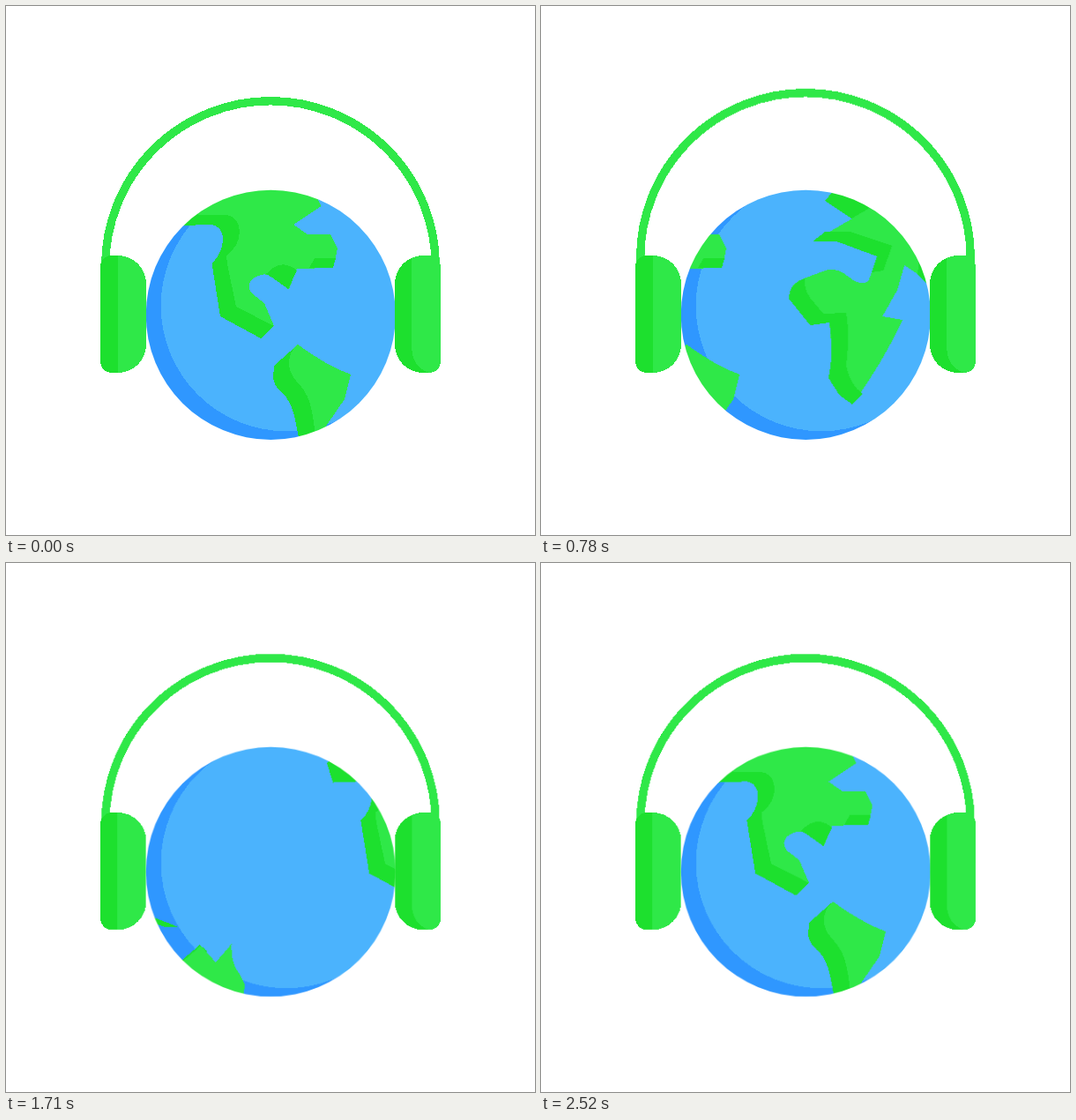
Write an HTML page without scripts that moves like this. It is 600 px wide and 600 px high and loops after 4.55 s.

```html
<!DOCTYPE html>
<html lang="en">
<head>
<meta charset="utf-8">
<title>Listening globe</title>
<style>
  html, body { margin: 0; width: 100%; height: 100%; overflow: hidden; background: #fff; }
  svg { display: block; width: 100%; height: 100%; shape-rendering: crispEdges; }

  .light { fill: #2fe848; }
  .dark { fill: #1de02e; }
  .sea { fill: #4bb3fd; }
  .shade { fill: #2f97ff; }
  .band { fill: none; stroke: #2fe848; stroke-width: 9.4; }

  .body, .band, .map { animation: 4550ms ease-in-out infinite; }
  .body { transform-origin: 300px 350.3px; animation-name: squash; }
  .band { animation-name: bob; }
  .map { animation-name: spin; }

  @keyframes spin {
    0% { transform: none; animation-timing-function: cubic-bezier(.333, 0, .655, 1); }
    55.385%, 100% { transform: translateX(-715px); }
  }
  @keyframes squash {
    0%, 7.91%, 18.9%, 27.25%, 41.54%, 48.13%, 100% { transform: none; }
    3.96%, 23.74%, 44.84% { transform: scale(1.047, .957); }
  }
  @keyframes bob {
    0%, 35.6%, 39.56%, 48.13%, 55.385%, 100% { transform: none; }
    3.3% { transform: translateY(9px); }
    8.57%, 17.14% { transform: translateY(-9.3px); }
    12.31% { transform: translateY(-11px); }
    22.86% { transform: translateY(9px); }
    25.05% { transform: translateY(6px); }
    30.77% { transform: translateY(-7px); }
    42.86% { transform: translateY(5.4px); }
    44.84% { transform: translateY(7px); }
    52.09% { transform: translateY(-10px); }
  }
</style>
</head>
<body>
<svg viewBox="0 0 600 600">
  <defs>
    <clipPath id="disc"><circle cx="300.3" cy="350.3" r="141.6"/></clipPath>
    <g id="land">
      <!-- North America -->
      <path class="dark" d="M211 200L211 209 195 227 202 249 228 248C240 246 247 255 246 267Q244 282 233.500 292L243 352 289 377 304 363 270 330 270 240Z"/>
      <path class="light" d="M208 200L218 237H250C264 239 268 255 262 269Q258 277 250 283L251 293 261 341 304 363 293 337 280 327C272 320 275 308 290 305Q296 303 302 308L321 321 330 298 371 297 376 275 368 259H342L326 248 357.500 227 345 200Z"/>
      <path class="dark" d="M295 304Q312 285 330 300L320 321 302 308ZM350 286H374L371 297H344Z"/>
      <!-- South America -->
      <path class="dark" d="M331 384L304 408 303 422Q304 430 311 437C326 449 327 464 333 495H353L356 420Z"/>
      <path class="light" d="M331 384Q321 392 321 405 321 416 329 425C346 442 347 456 352 495L355 488 384 446 391 418Q362 407 331 384Z"/>
      <!-- Eurasia and Africa -->
      <path class="light" d="M488 221L505 200 555 221 560 231 594 222 600 195H755L728 235 711 250Q697 268 695 280L690 317 695 329 694 337 684 343 655 317Q645 308 637 320L630 342H620L608 320 593 304 578 294 570 322 553 352 576 356Q553 405 519 452L504 441 492 422 496 395 493 359 471 362 447 332Q447 315 464 309L491 299C505 297 511 305 520 311Q530 317 537 312L541 302 547 284 501 267H474L519 241Z"/>
      <path class="dark" d="M488 221L505 200 545 222 537 230 518 241ZM474 267L488 256H516L564 272 554 300 541 302 547 284 501 267ZM595 283L620 297Q630 306 636 319L630 342H620L608 320 593 304ZM655 317L670 302.500 685 312 695 329 694 337 684 343ZM465 309Q464 321 471 331L486 349 512 348Q516 373 512 408 517 431 531 440L519 452 504 441 492 422Q498 392 493 359L471 362 447 332Q447 315 465 309Z"/>
      <!-- Southeast islands and Australia -->
      <path class="dark" d="M656.500 358L685.500 391 742 413H728L676 398 652.500 363ZM732 462L766 433 774 440 744 485Z"/>
      <path class="light" d="M735 462L767 434 784 453 802 432Q801 455 811 466L817 478 815 495H764L741 482Z"/>
    </g>
  </defs>

  <g class="body">
    <path class="band" d="M112.700 340V295A187.300 187.300 0 0 1 487.300 295V340"/>

    <g clip-path="url(#disc)">
      <path class="shade" d="M155 205H445V495H155Z"/>
      <circle class="sea" cx="318" cy="340" r="142.300"/>
      <!-- right side of the sea stays lit up to the rim -->
      <path class="sea" d="M318 198H445V420L382 467 318 340Z"/>
      <g class="map">
        <use href="#land"/>
        <use href="#land" x="715"/>
      </g>
    </g>

    <path class="light" d="M120 283H127A32 32 0 0 1 159 315V384A32 32 0 0 1 127 416H120A13 13 0 0 1 107 403V296A13 13 0 0 1 120 283Z"/>
    <path class="dark" d="M126.500 283H120A13 13 0 0 0 107 296V403A13 13 0 0 0 120 416H126.500Z"/>
    <path class="dark" d="M480 283H473A32 32 0 0 0 441 315V384A32 32 0 0 0 473 416H480Z"/>
    <path class="light" d="M460 286Q466 283 473 283H480A13 13 0 0 1 493 296V403A13 13 0 0 1 480 416Q460 410 460 384Z"/>
  </g>
</svg>
</body>
</html>
```
